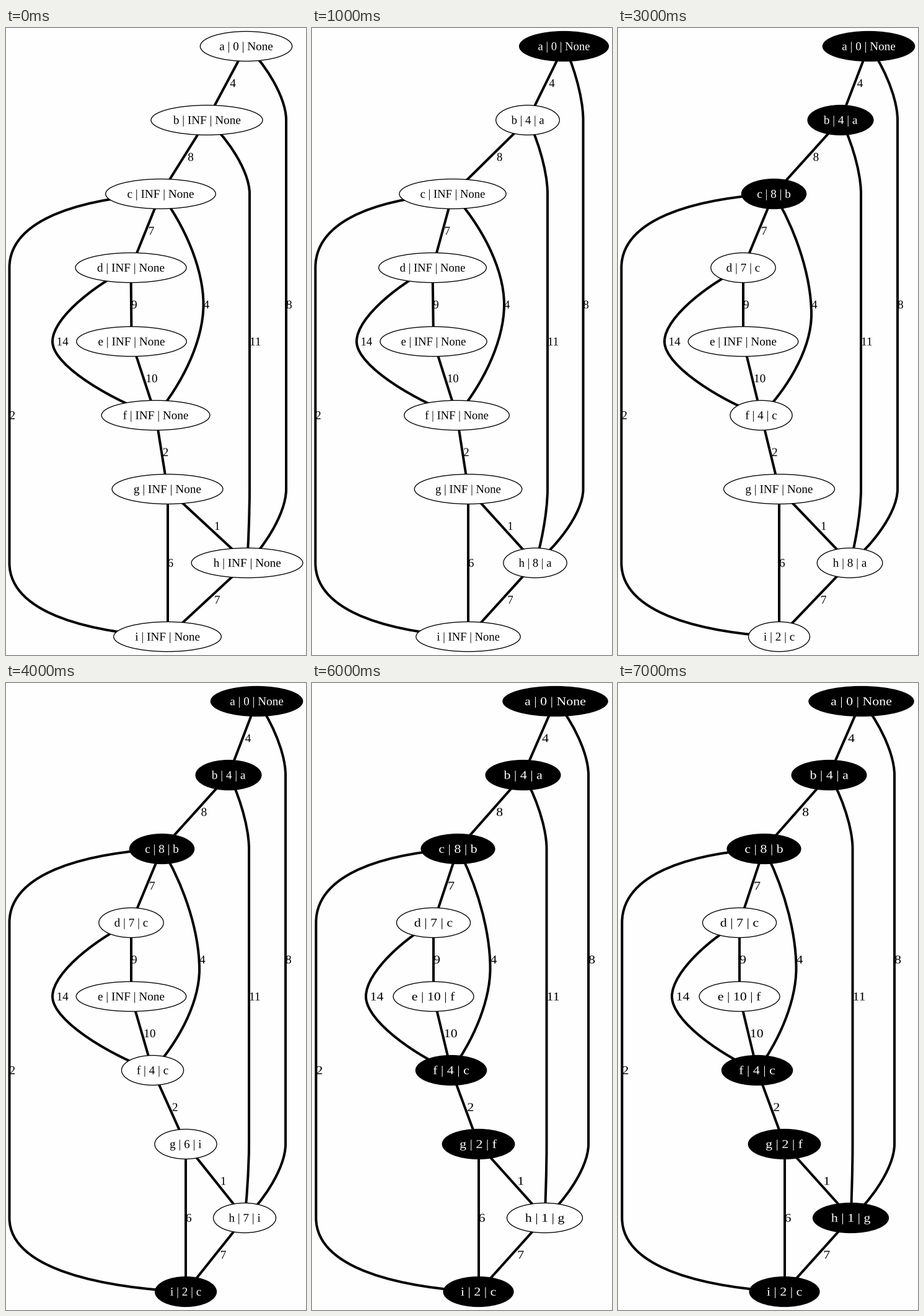
Animation, 484 px wide and 1011 px high, one loop 8 s. Source, as a matplotlib script:

```python
import matplotlib.pyplot as plt
from matplotlib.animation import FuncAnimation
from matplotlib.patches import Ellipse, PathPatch
from matplotlib.path import Path
from matplotlib.textpath import TextPath
from matplotlib.transforms import Affine2D

W, H, DPI = 484, 1011, 100
PX = 72 / DPI
TOP, RANK = 29.5, 119
NAMES = "abcdefghi"
FONT = {"family": "Liberation Serif"}
EM = 19.2

STRAIGHT = [("a", "b", 4), ("b", "c", 8), ("c", "d", 7), ("d", "e", 9), ("e", "f", 10),
            ("f", "g", 2), ("g", "h", 1), ("g", "i", 6), ("h", "i", 7)]

# Control points of half a bend: ((x, y), (x, y)) as shares of its size
ROUND = ((.37, .17), (1, .655))
FLAT = ((.45, .05), (1, .29))
LONG = ((.55, .28), (1, .67))
BENT = [("c", "i", 2, FLAT), ("d", "f", 14, ROUND), ("c", "f", 4, LONG),
        ("b", "h", 11, ROUND), ("a", "h", 8, ROUND)]

# Horizontal scale, peak of the c-f bend, node centres, outermost x of each bend
START = (1, 446, (387.5, 324, 249.5, 201.5, 202.5, 241.5, 260.5, 389, 260.5),
         (5.5, 75, 318.5, 393, 452))
ROOT = (.97, 446, (406.5, 348, 227, 194.5, 196, 233.5, 252, 360, 252),
        (5.5, 72, 310, 380, 437.5))
SECOND = (1, 446, (404.5, 359, 250.5, 201, 202, 225.5, 260, 374, 260),
          (5.5, 75, 319.5, 392, 451))
THIRD = (1, 462, (404.5, 359, 251.5, 202, 202, 231, 260, 374, 260),
         (5.5, 75, 312, 392, 451))
FOURTH = (1, 462, (404.5, 359, 251.5, 202, 202, 236.5, 290, 385, 290),
          (5.5, 75, 312, 392, 451))
FIFTH = (1.141, 460, (392.5, 340.5, 235.5, 196, 196, 224.5, 268.5, 373.5, 268.5),
         (6.5, 87, 287.5, 378.5, 446))
LAST = FIFTH[:2] + (FIFTH[2][:7] + (375.5, 268.5), FIFTH[3])

# Layout, distance and parent per node, finished nodes
STEPS = [
    (START, "0 INF INF INF INF INF INF INF INF", ""),
    (ROOT, "0 4a INF INF INF INF INF 8a INF", "a"),
    (SECOND, "0 4a 8b INF INF INF INF 8a INF", "ab"),
    (THIRD, "0 4a 8b 7c INF 4c INF 8a 2c", "abc"),
    (FOURTH, "0 4a 8b 7c INF 4c 6i 7i 2c", "abci"),
    (FIFTH, "0 4a 8b 7c 10f 4c 2f 7i 2c", "abcif"),
    (LAST, "0 4a 8b 7c 10f 4c 2f 1g 2c", "abcifg"),
    (LAST, "0 4a 8b 7c 10f 4c 2f 1g 2c", "abcifgh"),
]

fig = plt.figure(figsize=(W / DPI, H / DPI), dpi=DPI, facecolor="#fefefe")
ax = fig.add_axes([0, 0, 1, 1])
ax.set_xlim(0, W)
ax.set_ylim(H, 0)
ax.axis("off")


def rank_y(name):
    return TOP + RANK * NAMES.index(name)


def glyphs(text):
    return TextPath((0, 0), text, size=EM, prop=FONT)


def put_text(path, x, y, sx, color="black"):
    place = Affine2D().scale(sx, -1).translate(x, y + 6.2)
    ax.add_patch(PathPatch(path.transformed(place), fc=color, lw=0, zorder=4))


def stroke(points, codes):
    ax.add_patch(PathPatch(Path(points, codes), fill=False, ec="black",
                           lw=4 * PX, capstyle="butt", zorder=1))


def half_bend(x, y, far, end, shape):
    """Four cubic points from a node centre to where the bend runs vertical."""
    dx, dy = far - x, end - y
    return [(x + u * dx, y + v * dy) for u, v in ((0, 0),) + shape + ((1, 1),)]


def draw_bend(x0, y0, x1, y1, far, shape, peak):
    if shape is LONG:
        ends = peak, peak
    else:
        ends = y0 + RANK, y1 - RANK
    first = half_bend(x0, y0, far, ends[0], shape)
    second = half_bend(x1, y1, far, ends[1], shape)[::-1]
    curve = [Path.CURVE4] * 3
    stroke(first + second, [Path.MOVETO] + curve + [Path.LINETO] + curve)


def draw_node(x, y, text, sx, done):
    path = glyphs(text)
    box = path.get_extents()
    width = sx * (1.375 * box.width + 31)
    ax.add_patch(Ellipse((x, y), width, 48, fc="black" if done else "white",
                         ec="black", lw=1.33 * PX, zorder=3))
    mid = (box.x0 + box.x1) / 2
    put_text(path, x - sx * mid, y, sx, "white" if done else "black")


def draw(i):
    for patch in list(ax.patches):
        patch.remove()
    (sx, peak, centres, fars), tags, done = STEPS[i]
    xs = dict(zip(NAMES, centres))

    for p, q, weight in STRAIGHT:
        (x0, y0), (x1, y1) = (xs[p], rank_y(p)), (xs[q], rank_y(q))
        stroke([(x0, y0), (x1, y1)], [Path.MOVETO, Path.LINETO])
        left = (x0 + x1) / 2 + .087 * abs(x1 - x0)
        put_text(glyphs(str(weight)), left, (y0 + y1) / 2, sx)

    for (p, q, weight, shape), far in zip(BENT, fars):
        y0, y1 = rank_y(p), rank_y(q)
        draw_bend(xs[p], y0, xs[q], y1, far, shape, peak)
        gap = 6.5 if p == "d" else 0
        put_text(glyphs(str(weight)), far + gap, (y0 + y1) / 2, sx)

    for name, tag in zip(NAMES, tags.split()):
        dist, prev = (tag[:-1], tag[-1]) if tag[-1].islower() else (tag, "None")
        draw_node(xs[name], rank_y(name), f"{name} | {dist} | {prev}", sx, name in done)
    return ax.patches


anim = FuncAnimation(fig, draw, frames=len(STEPS), interval=1000,
                     repeat=True, repeat_delay=0, blit=False)
plt.show()
```
